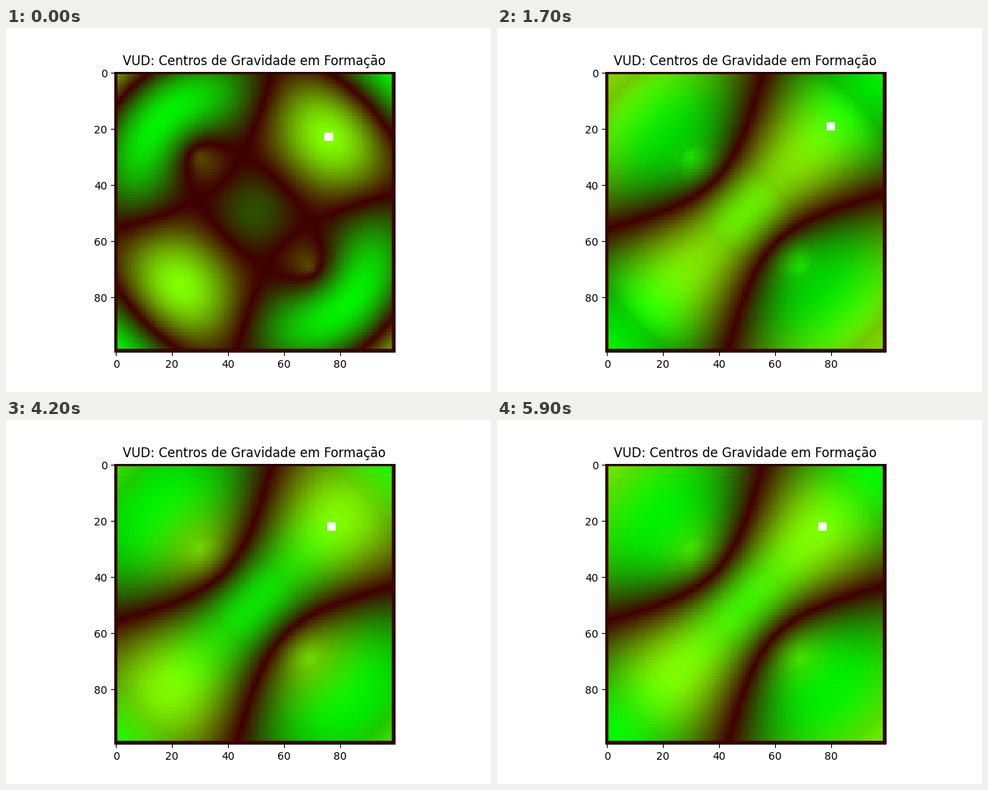
Animation of 640x480 px, one loop 6000 ms. Source, as a matplotlib script:

```python
import numpy as np
import matplotlib.pyplot as plt
from matplotlib.animation import FuncAnimation

SIZE = 100
FRAMES = 60
INTERVAL = 100
STEP = np.pi / 10    # wave phase per frame
START_WEIGHT = 4     # the first wave counts this often in the memory

axis = np.linspace(-5, 5, SIZE)
X, Y = np.meshgrid(axis, axis)
R1 = np.hypot(X + 2, Y + 2)
R2 = np.hypot(X - 2, Y - 2)


def wave(n):
    """Mean of two circular waves, held at zero on the border."""
    psi = (np.sin(n * STEP - R1) + np.sin(n * STEP - R2)) / 2
    psi[[0, -1], :] = 0
    psi[:, [0, -1]] = 0
    return psi


waves = np.array([wave(n) for n in range(FRAMES)])
strength = np.abs(waves)
strength[0] *= START_WEIGHT
memory = np.cumsum(strength, axis=0)


def picture(n):
    """Red follows the wave, green the memory; the strongest spot is white."""
    total = memory[n]
    img = np.zeros((SIZE, SIZE, 3))
    img[..., 0] = (1 + waves[n]) / 4
    img[..., 1] = total / total.max()
    # search the upper half only: the field is point-symmetric
    row, col = divmod(int(np.argmax(total[:SIZE // 2])), SIZE)
    img[row - 1:row + 2, col - 1:col + 2] = 1
    return np.clip(img, 0, 1)


fig, ax = plt.subplots(figsize=(6.4, 4.8), dpi=100)
image = ax.imshow(picture(0))
ax.set_title("VUD: Centros de Gravidade em Formação")


def update(n):
    image.set_data(picture(n))
    return [image]


anim = FuncAnimation(fig, update, frames=FRAMES, interval=INTERVAL,
                     repeat=True, repeat_delay=0, blit=False)
plt.show()
```
